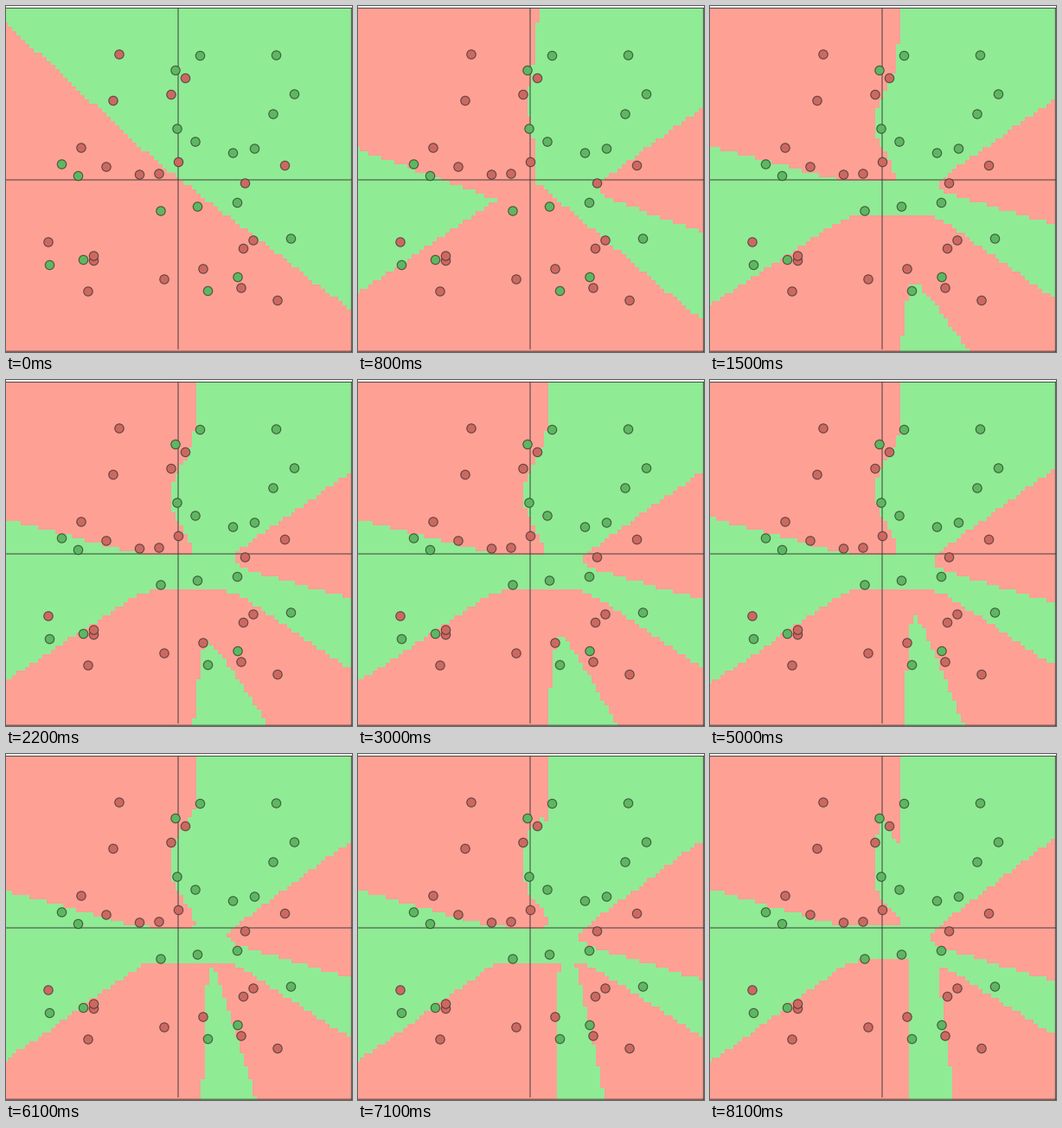
A matplotlib script for the animation above (8200 ms loop, 400 by 400 pixels).

```python
import numpy as np
import matplotlib.pyplot as plt
from matplotlib.animation import FuncAnimation
from matplotlib.patches import Circle, Rectangle

SIZE, FRAMES, INTERVAL = 400, 82, 100
CELLS, CELL = 81, 4.9625
LEFT, TOP = -2.97, -0.97
GREEN, RED = np.array([144, 235, 149]) / 255, np.array([255, 160, 149]) / 255
DOT_GREEN, DOT_RED = "#5cb860", "#cd6861"
INK = "#33332c"

# The training samples of each class.
RED_DOTS = [(131, 56), (207.5, 83.5), (191, 102.5), (124, 109.5), (87, 164),
            (116, 186), (154.5, 195), (177, 194), (199.5, 180.5),
            (322.5, 184.5), (276.5, 205), (286, 271), (274.5, 280.5),
            (49, 273), (101.5, 294.5), (101.5, 289), (183, 316), (95, 330),
            (228, 304), (272, 326), (314, 340.5)]
GREEN_DOTS = [(224.5, 57.5), (312.5, 57), (196, 74.5), (333.5, 102),
              (309, 125), (198, 142), (219, 157), (262.5, 170), (287.5, 165),
              (64.5, 183), (83.5, 196.5), (179, 237), (221.5, 232),
              (267.5, 227.5), (329.5, 269), (50.5, 299.5), (89.5, 293.5),
              (268, 313.5), (233.5, 329.5)]

steps = (np.arange(CELLS) + 0.5) * CELL
X, Y = np.meshgrid(LEFT + steps, TOP + steps)


def below(x, y, slope):
    """Signed distance to a line through (x, y), positive beneath it."""
    return (Y - y - slope * (X - x)) / np.hypot(1, slope)


def right_of(x, y, lean):
    """Signed distance to a steep line through (x, y), positive to its right."""
    return (X - x - lean * (Y - y)) / np.hypot(1, lean)


def meet(soft, *parts):
    """Intersection of regions with rounded corners."""
    return -soft * np.logaddexp.reduce([-part / soft for part in parts])


def trained(t):
    """Signed distance, positive in red, as training settles over t seconds."""
    settle = np.exp(-max(t - 0.8, 0) / 0.25)
    drift = np.clip((t - 1.5) / 6.6, 0, 1)
    late = drift ** 4

    def path(first, early, last):
        return early + (first - early) * settle + (last - early) * drift

    # Upper left: a dented right side over a sloping base.
    side = path(208, 219, 221)
    offset = np.abs(Y - path(110, 136, 124)) / (44 + 11 * late)
    dent = path(12, 30, 29) * np.exp(-offset ** (2 + 4 * late))
    corner = meet(2, side - dent - X,
                  -below(0, path(165, 162, 156), path(0.37, 0.25, 0.28)),
                  path(240, 202, 200) - Y)

    # A tooth that comes down beside the dent.
    tooth = meet(1, side - X, right_of(214, 98 - 60 * (1 - late), 0.55))

    wedge = meet(10, below(400, path(116, 107, 97), -path(0.72, 0.68, 0.74)),
                 -below(400, path(262, 252, 263), path(0.35, 0.27, 0.29)))

    # Lower hill, opened from the bottom by a green slot.
    hill = meet(4, below(0, path(331, 346, 357), -path(0.67, 0.64, 0.73)),
                Y - path(190, 244, 239),
                below(400, path(365, 337, 326), path(0.83, 0.68, 0.62)))
    slot = meet(8, right_of(path(300, 215, 232), 400, -path(0.2, 0.12, 0)),
                -right_of(path(200, 306, 282), 400, path(0.7, 0.72, 0.12)))

    return np.maximum.reduce([corner, tooth, wedge, np.minimum(hill, -slot)])


def colours(index):
    t = index * INTERVAL / 1000
    untrained = np.maximum(below(0, 20, 0.92), below(400, 352, 0.76))
    mix = min(t / 0.8, 1)
    red = (1 - mix) * np.tanh(untrained / 40) + mix * np.tanh(trained(t) / 40)
    return np.where(red[..., None] > 0, RED, GREEN)


fig = plt.figure(figsize=(4, 4), dpi=100)
ax = fig.add_axes([0, 0, 1, 1])
ax.axis("off")
image = ax.imshow(colours(0), interpolation="nearest", aspect="auto",
                  extent=(LEFT, LEFT + CELLS * CELL, TOP + CELLS * CELL, TOP))
ax.set_xlim(0, SIZE)
ax.set_ylim(SIZE, 0)

ax.add_patch(Rectangle((0, 0), SIZE, 2, color="white", lw=0))
for xs, ys in [((0, 400), (2.4, 2.4)), ((0, 400), (399.2, 399.2)),
               ((399.4, 399.4), (2, 400)), ((199, 199), (2, 397)),
               ((0, 400), (201, 201))]:
    ax.plot(xs, ys, color=INK, lw=0.8, alpha=0.8, solid_capstyle="butt",
            snap=False)

for dots, fill in [(RED_DOTS, DOT_RED), (GREEN_DOTS, DOT_GREEN)]:
    for x, y in dots:
        ax.add_patch(Circle((x, y), 5.2, color=fill, lw=0, zorder=3))
        ax.add_patch(Circle((x, y), 5.2, fill=False, ec=INK, lw=0.8,
                            alpha=0.75, zorder=3))


def update(index):
    image.set_data(colours(index))
    return [image]


animation = FuncAnimation(fig, update, frames=FRAMES, interval=INTERVAL,
                          repeat=True, repeat_delay=0)
plt.show()
```
